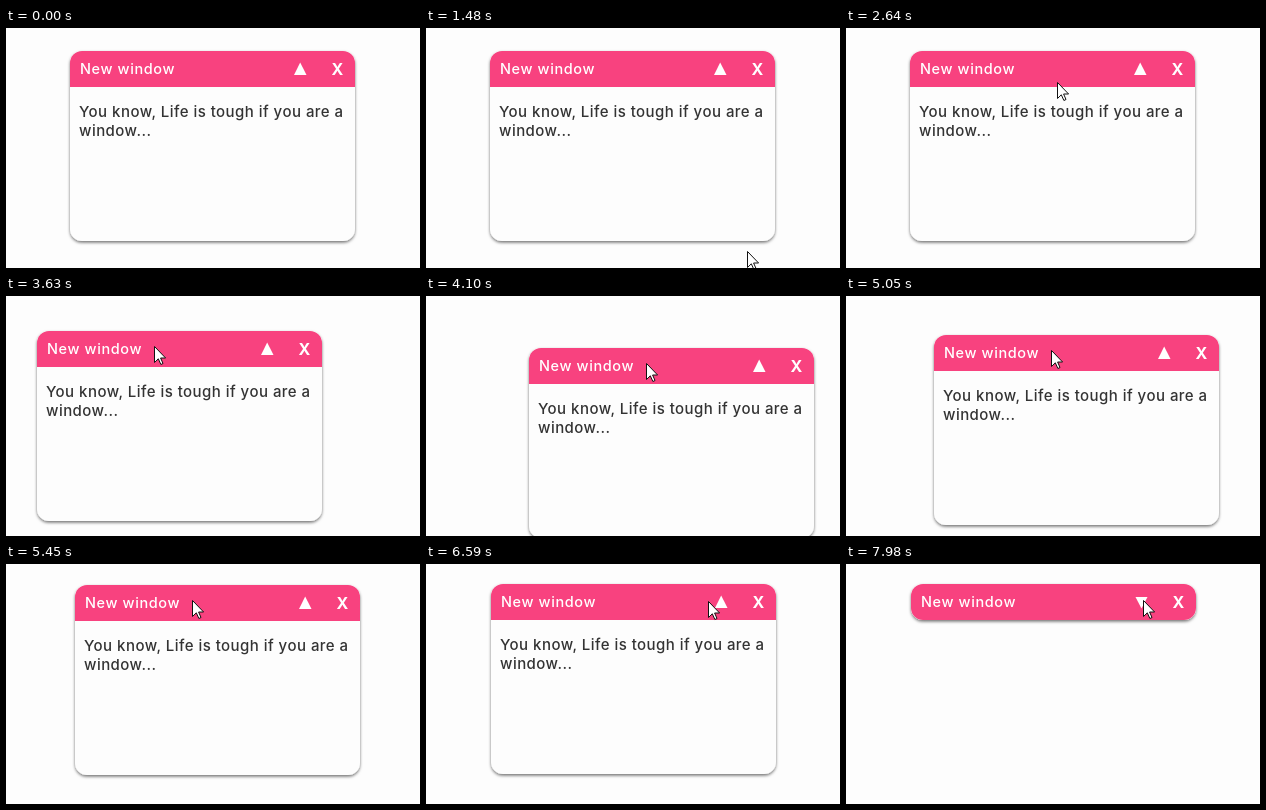
Write an HTML page that moves like this. It is 414 px wide and 240 px high and loops after 8000 ms.

```html
<!DOCTYPE html>
<html lang="en">
<head>
<meta charset="utf-8">
<title>New window</title>
<style>
  html, body { margin: 0; width: 100%; height: 100%; overflow: hidden; background: #fdfdfd; }
  svg { display: block; width: 414px; height: 240px; }
  text { font-family: Inter, sans-serif; font-weight: 500; }
</style>
</head>
<body>
<svg viewBox="0 0 414 240">
  <defs>
    <clipPath id="frame"><rect class="size" width="285" height="190" rx="12"/></clipPath>
    <filter id="shadow" x="-5%" y="-20%" width="110%" height="140%">
      <feDropShadow dx="0" dy="1.6" stdDeviation="1.5" flood-color="#000" flood-opacity=".55"/>
    </filter>
  </defs>
  <rect width="414" height="240" fill="#fdfdfd"/>
  <g id="win">
    <rect class="size" width="285" height="190" rx="12" fill="#fdfdfd" filter="url(#shadow)"/>
    <g clip-path="url(#frame)">
      <g font-size="15" fill="#333" letter-spacing=".46">
        <text x="9" y="66">You know, Life is tough if you are a</text>
        <text x="9" y="85">window...</text>
      </g>
      <rect width="285" height="36" fill="#f8427f"/>
      <text x="10" y="23" font-size="14.5" fill="#fff" letter-spacing=".6">New window</text>
      <path id="arrow" fill="#fff"/>
      <text x="261.5" y="24" font-size="16" fill="#fff" style="font-weight:700">X</text>
    </g>
  </g>
  <path id="cursor" d="M.5 .5V16.5L4.3 12.8 6.9 18.5 9 17.5 6.6 12H11.6Z" fill="#fff" stroke="#111"/>
</svg>
<script>
const LOOP = 8000;
const STEP = 190 / 3, PHASE = 42;   // the picture updates on this beat
const GRAB = [117, 15];             // cursor offset while dragging
const SHOW = 1360, HOLD = 3140, DROP = 6050, FOLD = 7245, FOLD_TIME = 300;

// key points as [time, x, y]
const approach = [[SHOW, 325, 231], [2130, 284, 151], [2638, 211, 54], [2880, 181, 40]];
const drag = [
  [HOLD, 64, 23], [3350, 50, 19], [3600, 31, 36], [3850, 60, 60], [4095, 103, 52],
  [4380, 72, 4], [4665, 32, 39], [4850, 60, 57], [5045, 88, 39], [5450, 68, 20], [5820, 65, 20]
];
const leave = [[DROP, 182, 35], [6300, 222, 22], [6565, 282, 37], [6850, 297, 36]];

const $ = id => document.getElementById(id);
const sizes = document.querySelectorAll('.size');
const clamp = v => Math.max(0, Math.min(1, v));
const snap = t => PHASE + STEP * Math.floor((t - PHASE) / STEP);
const place = (el, [x, y]) => el.setAttribute('transform', `translate(${x} ${y})`);

// smooth curve through unevenly timed points, whole pixels
function follow(path, t) {
  const last = path.length - 1;
  if (t <= path[0][0]) return path[0].slice(1);
  if (t >= path[last][0]) return path[last].slice(1);
  const i = path.findIndex(p => p[0] > t) - 1;
  const p = path[i], q = path[i + 1];
  const before = path[Math.max(0, i - 1)], after = path[Math.min(last, i + 2)];
  const d = q[0] - p[0], u = (t - p[0]) / d, v = 1 - u;
  return [1, 2].map(k => {
    const m = (q[k] - before[k]) / (q[0] - before[0]) * d;
    const n = (after[k] - p[k]) / (after[0] - p[0]) * d;
    return Math.round(v * v * (1 + 2 * u) * p[k] + u * u * (3 - 2 * u) * q[k]
      + u * v * v * m - u * u * v * n);
  });
}

function pointer(t, win) {
  if (t < HOLD) return follow(approach, t);
  if (t < DROP) return win.map((v, i) => v + GRAB[i]);
  return follow(leave, t);
}

function draw(time) {
  const t = snap(time % LOOP);
  const win = follow(drag, t);
  place($('win'), win);
  place($('cursor'), pointer(t, win));
  $('cursor').style.display = t < SHOW ? 'none' : '';

  const fold = clamp((t - FOLD) / FOLD_TIME);
  const height = 36 + 154 * (1 + Math.cos(Math.PI * fold)) / 2;
  sizes.forEach(r => r.setAttribute('height', height));
  $('arrow').setAttribute('d', fold ? 'M224.5 13H236.5L230.5 24.5Z' : 'M224 24H236.5L230.2 11.5Z');
}

const start = performance.now();
function tick() {
  draw(performance.now() - start);
  requestAnimationFrame(tick);
}
tick();
</script>
</body>
</html>
```
